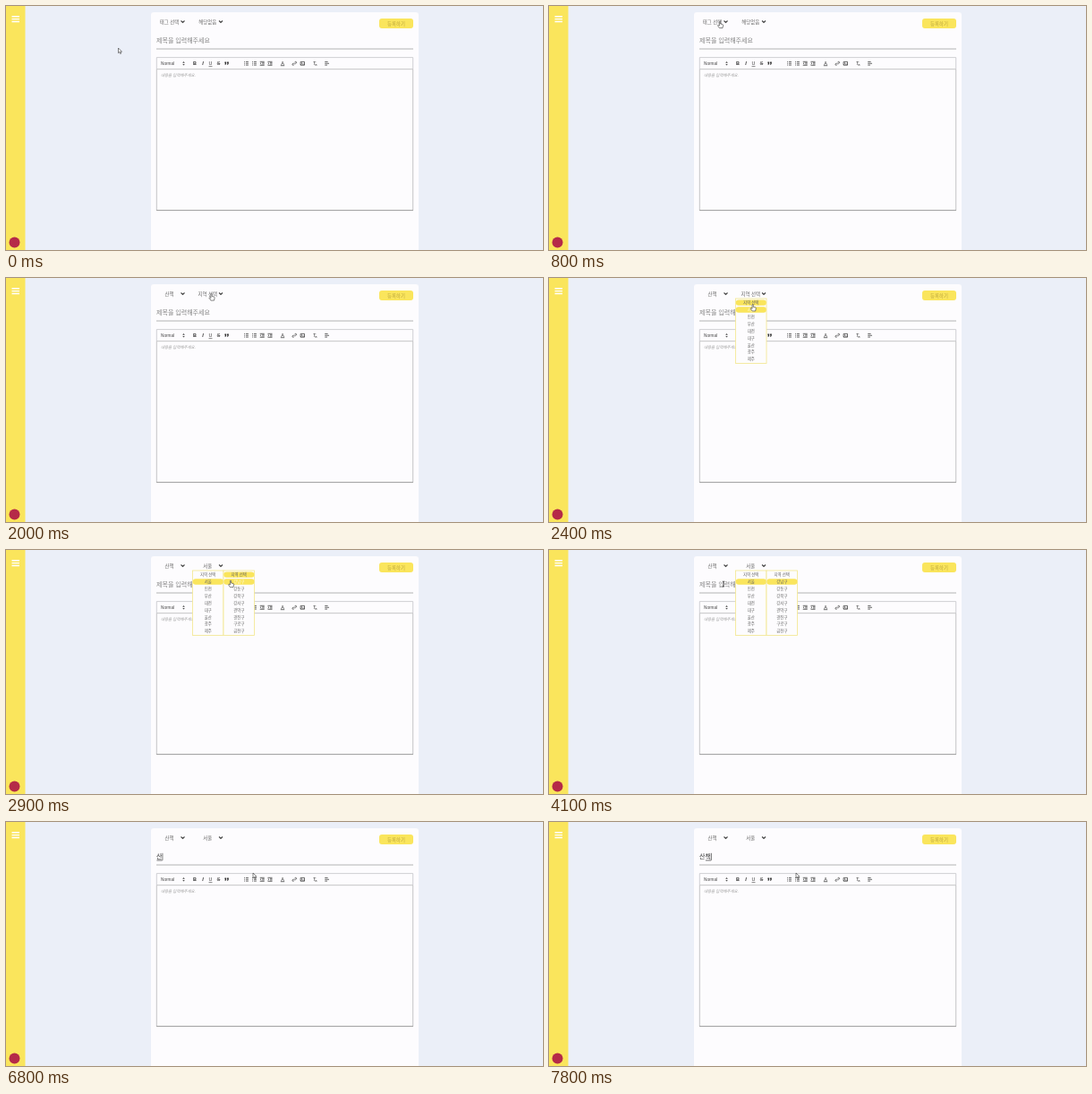
Write an HTML page that moves like this. It is 600x273 px and loops after 8000 ms.

```html
<!DOCTYPE html>
<html lang="ko">
<head>
<meta charset="utf-8">
<style>
html, body { margin: 0; width: 100%; height: 100%; overflow: hidden; background: #ebeff8; }
svg { display: block; width: 600px; height: 273px; }
text { font-family: "Noto Sans CJK KR", "Noto Sans CJK", sans-serif; white-space: pre; }
.latin { font-family: "Liberation Sans", Arial, sans-serif; }
.icon { fill: none; stroke: #444; stroke-width: .8; }
</style>
</head>
<body>
<svg viewBox="0 0 600 273">
  <defs>
    <filter id="shadow" x="-30%" y="-20%" width="170%" height="160%">
      <feDropShadow dx="2" dy="5" stdDeviation="4" flood-color="#000" flood-opacity=".28"/>
    </filter>
  </defs>
  <rect width="600" height="273" fill="#ebeff8"/>
  <rect width="21.5" height="273" fill="#fae55c"/>
  <path d="M6.5 11.7h8.5M6.5 14.6h8.5M6.5 17.5h8.5" stroke="#fff" stroke-width="1.4"/>
  <circle cx="9.5" cy="264.5" r="6" fill="#b52a48"/>
  <rect x="162" y="7" width="299" height="275" rx="3" fill="#fdfcfe"/>
  <rect x="417" y="14" width="38" height="11" rx="3" fill="#fae55c"/>
  <path d="M168 48h287" stroke="#aaa" stroke-width=".9"/>
  <g fill="none" stroke="#b5b5b8" stroke-width=".8">
    <path d="M168.3 70.5V57.6H454.7V70.5" stroke="#c4c4c8"/>
    <path d="M168.3 70.7H454.7V228.6H168.3Z"/>
    <path d="M168 228.6H455" stroke="#999"/>
  </g>
  <g id="bar"></g>
  <g id="live"></g>
</svg>
<script>
const YELLOW = '#fae55c', PAPER = '#fdfcfe', GRAY = '#666';
const $ = id => document.getElementById(id);

// Text centred vertically on y
const text = (s, x, y, size, fill = GRAY, more = '') =>
  `<text x="${x}" y="${y + size * .37}" font-size="${size}" fill="${fill}" ${more}>${s}</text>`;
const mid = (s, x, y, size, fill, more = '') =>
  text(s, x, y, size, fill, 'text-anchor="middle" ' + more);
const box = (x, y, w, h, fill, rx = 0) =>
  `<rect x="${x}" y="${y}" width="${w}" height="${h}" rx="${rx}" fill="${fill}"/>`;
const icon = (x, d) => `<path class="icon" transform="translate(${x} 64.3)" d="${d}"/>`;
const letter = (s, x, more = '') => mid(s, x, 64.3, 5.4, '#333', 'class="latin" ' + more);

const LIST = 'M-2.4-1.8h.9M-2.4 0h.9M-2.4 1.8h.9M-.6-1.8h3M-.6 0h3M-.6 1.8h3';
const indent = dir => `M-2.5-2h5M0-.6h2.5M0 .7h2.5M-2.5 2h5M${-1.6 - dir * .7}-1l${dir * 1.2} 1l${-dir * 1.2} 1`;

$('bar').innerHTML =
  mid('등록하기', 436, 19.6, 5.4, '#bfa93f') +
  text('Normal', 173, 64.4, 4.7, '#444', 'class="latin"') +
  '<path d="M197.2 63.7l1.3-1.6 1.3 1.6zM197.2 65l1.3 1.6 1.3-1.6z" fill="#444"/>' +
  letter('B', 211, 'font-weight="bold"') +
  letter('I', 220, 'font-style="italic" font-weight="bold"') +
  letter('U', 228.5, 'text-decoration="underline"') +
  letter('S', 237.5, 'text-decoration="line-through"') +
  '<path d="M244.4 62.4h1.8v1.9l-.9 1.8h-.8l.6-1.7h-.7zM247 62.4h1.8v1.9l-.9 1.8h-.8l.6-1.7h-.7z" fill="#333"/>' +
  icon(268.5, LIST) + icon(277.5, LIST) + icon(286.2, indent(-1)) + icon(295, indent(1)) +
  letter('A', 309) + icon(309, 'M-2.2 2.4h4.4') +
  icon(322.3, 'M-.3 1.3l-.7.7a1 1 0 0 1-1.2-1.4l1.2-1.1M.3-1.3l.7-.7a1 1 0 0 1 1.2 1.4l-1.2 1.1M-.9.9l1.8-1.8') +
  icon(331.3, 'M-2.2-1.9h4.4v3.8h-4.4zM-2 1.6l1.3-1.5.9.8.7-.6 1.2 1.3M-1-.8h.6') +
  letter('T', 344.4, 'font-style="italic"') + icon(346.4, 'M-.7.9l1.4 1.4M.7.9l-1.4 1.4') +
  icon(358.5, 'M-2.3-1.8h3.4M-2.3 0h4.8M-2.3 1.8h2.8') +
  text('내용을 입력해주세요.', 173, 77.3, 4.4, '#999', 'font-style="italic"');

const TAGS = ['태그 선택', '산책', '분실', '용품', '카페/시설', '병원', '기타'];
const CITIES = ['지역 선택', '서울', '인천', '부산', '대전', '대구', '울산', '광주', '제주'];
const AREAS = ['지역 선택', '강남구', '강동구', '강북구', '강서구', '관악구', '광진구', '구로구', '금천구'];

// Pointer path: time, x, y
const PATH = [
  [0, 125.5, 47], [100, 125.5, 47], [700, 191, 17], [1100, 191, 17], [1400, 188, 33], [1500, 188, 33],
  [1900, 229.5, 17.5], [2200, 229.5, 17.5], [2500, 227, 33.5], [2600, 227, 33.5], [2900, 251, 34],
  [3200, 251, 34], [3900, 195, 38], [5400, 195, 38], [5600, 246.5, 48], [6000, 276, 57], [8000, 276, 57]
];
// Composed title text: time, value
const TYPED = [[0, ''], [6500, 'ㅅ'], [6700, '사'], [6800, '산'], [7300, '산ㅊ'], [7500, '산채'], [7700, '산책']];

function pointer(t) {
  const i = PATH.findIndex(p => p[0] > t);
  const [t0, x0, y0] = PATH[i - 1], [t1, x1, y1] = PATH[i];
  const k = (t - t0) / (t1 - t0), e = k * k * (3 - 2 * k);
  return [x0 + (x1 - x0) * e, y0 + (y1 - y0) * e];
}

const SHAPES = {
  arrow: '<path d="M0 0V5.6L1.3 4.5 2.2 6.5 3.1 6.1 2.2 4.2H4Z" fill="#fff" stroke="#333" stroke-width=".6"/>',
  hand: '<path d="M-.6.4Q0-.4.6.4V3L3 3.5Q3.7 3.8 3.6 4.6L3 7.6H-.6L-2.5 4.9Q-2.3 4-1.5 4.4L-.6 5Z" fill="#fff" stroke="#333" stroke-width=".6"/>',
  beam: '<path d="M-1.2-3Q0-3 0-2.3 0-3 1.2-3M0-2.3V2.3M-1.2 3Q0 3 0 2.3 0 3 1.2 3" fill="none" stroke="#222" stroke-width=".75"/>'
};

function cursor(t) {
  const [x, y] = pointer(t);
  const shape = t < 600 || t >= 5800 ? 'arrow' : t < 3600 ? 'hand' : 'beam';
  return `<g transform="translate(${x} ${y})">${SHAPES[shape]}</g>`;
}

const chevron = x =>
  `<path d="M${x - 2} 16.5l2 2 2-2" fill="none" stroke="#444" stroke-width="1.1"/>`;

function title(t) {
  const s = TYPED.filter(p => p[0] <= t).pop()[1];
  const end = 168.2 + s.length * 6.45;
  const lit = s ? true : t >= 4800 && (t - 4800) % 1000 < 500;
  return (s ? text(s, 168, 38.7, 7, '#333') + box(end - 6.2, 42.6, 6.2, .7, '#333')
            : text('제목을 입력해주세요', 168, 38.7, 7, '#858585')) +
    (lit ? box(end, 34.8, .6, 8, '#333') : '');
}

function tagMenu(t) {
  const on = t < 1300 ? 0 : 1;
  return `<g filter="url(#shadow)">${box(168, 21.5, 34.5, 64.5, YELLOW)}</g>` +
    box(168, 21.5 + on * 9.2, 34.5, 9.2, '#1e8df2') +
    TAGS.map((s, i) => mid(s, 185.3, 26 + i * 9.1, 5.5, i === on ? '#fff' : '#73682f')).join('');
}

function column(items, x, chosen, hover) {
  return box(x, 23, 34.5, 72.8, PAPER) +
    `<rect x="${x}" y="23" width="34.5" height="72.5" fill="none" stroke="#f3e68c" stroke-width=".8"/>` +
    items.map((s, i) => {
      const y = 27.6 + i * 7.88, lit = i === chosen || i === hover;
      return (lit ? box(x + .3, y - 3.2, 34, 6.4, YELLOW, 3) : '') +
        mid(s, x + 17.2, y, 4.4, i === hover && i !== chosen ? '#fffbe0' : GRAY);
    }).join('');
}

function areaMenu(t) {
  const city = t < 2600 ? 0 : 1, area = t < 3000 ? 0 : 1;
  return column(CITIES, 208.5, t >= 3000 || city ? 1 : 0, t >= 2400 && t < 2700 ? 1 : -1) +
    (city ? column(AREAS, 243, area, t >= 2800 && t < 3400 ? 1 : -1) : '');
}

function draw(now) {
  const t = Math.floor(now % 8000 / 100) * 100;
  const tag = t < 1500 ? '태그 선택' : '산책';
  const area = t < 1500 ? '해당없음' : t < 2600 ? '지역 선택' : '서울';
  $('live').innerHTML =
    mid(tag, 182.5, 17.6, 5.4) + chevron(197.5) +
    mid(area, 225.2, 17.6, 5.4) + chevron(240) +
    title(t) +
    (t >= 900 && t < 1500 ? tagMenu(t) : '') +
    (t >= 2200 && t < 5000 ? areaMenu(t) : '') +
    cursor(t);
}

const start = performance.now();
function tick() {
  draw(performance.now() - start);
  requestAnimationFrame(tick);
}
tick();
</script>
</body>
</html>
```
